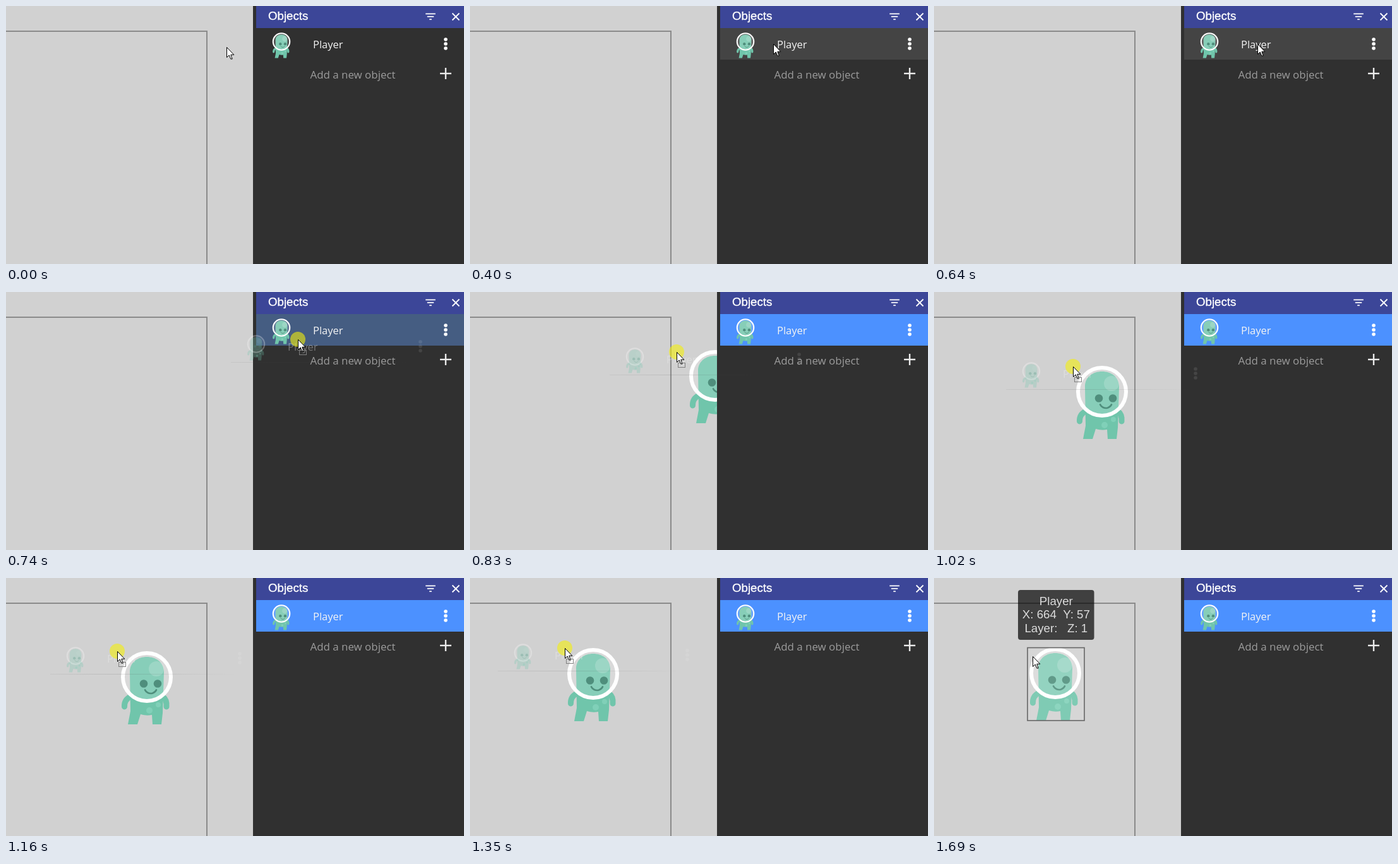
These frames come from a looping animation (725 px wide and 409 px high, 2.84 s). An HTML page with a canvas:

```html
<!DOCTYPE html>
<html lang="en">
<head>
<meta charset="utf-8">
<title>Drag an object onto the scene</title>
<style>
html, body { margin: 0; width: 100%; height: 100%; overflow: hidden; background: #303030; }
canvas { display: block; }
</style>
</head>
<body>
<canvas id="stage" width="725" height="409"></canvas>
<script>
const ctx = document.getElementById('stage').getContext('2d');
const W = 725, H = 409, LOOP = 2840;
const PANEL = 391, LIST = 396, ROW_TOP = 35, ROW_H = 50;
const ARIAL = '18.7px "Liberation Sans", Arial, sans-serif';
const DRAG = 740, DROP = 1450, LABEL = 1500;
const GRAB = { x: 502, y: 49 };
const REFRESH = 1000 / 60;

// Turning points of the pointer, joined by a smooth curve.
const PATH = [
  { t: 160, x: 349, y: 65 },
  { t: 400, x: 480, y: 60 },
  { t: 540, x: 529, y: 50 },
  { t: 740, x: 463, y: 75 },
  { t: 830, x: 328, y: 95 },
  { t: 1020, x: 220, y: 118 },
  { t: 1260, x: 158, y: 112.5 },
  { t: 1600, x: 148, y: 112 },
  { t: 1690, x: 156, y: 124 }
];

const clamp = (v, lo, hi) => Math.min(Math.max(v, lo), hi);

function slope(i, axis) {
  const a = PATH[Math.max(i - 1, 0)], b = PATH[Math.min(i + 1, PATH.length - 1)];
  return (b[axis] - a[axis]) / (b.t - a.t);
}

function pointer(time) {
  const t = clamp(time, PATH[0].t, PATH.at(-1).t);
  const i = Math.max(PATH.findIndex(p => p.t >= t) - 1, 0);
  const a = PATH[i], b = PATH[i + 1], d = b.t - a.t, u = (t - a.t) / d;
  const at = axis => {
    const p = a[axis], q = b[axis];
    const m = slope(i, axis) * d, n = slope(i + 1, axis) * d;
    return p + u * (m + u * (3 * (q - p) - 2 * m - n + u * (2 * (p - q) + m + n)));
  };
  return { x: at('x'), y: at('y') };
}

function rect(x, y, w, h, color) {
  ctx.fillStyle = color;
  ctx.fillRect(x, y, w, h);
}

function frameRect(x, y, w, h, color, width) {
  ctx.strokeStyle = color;
  ctx.lineWidth = width;
  ctx.strokeRect(x, y, w, h);
}

function dot(x, y, r, color) {
  ctx.fillStyle = color;
  ctx.beginPath();
  ctx.arc(x, y, r, 0, Math.PI * 2);
  ctx.fill();
}

function arc(x, y, r, from, to, color, width) {
  ctx.strokeStyle = color;
  ctx.lineWidth = width;
  ctx.beginPath();
  ctx.arc(x, y, r, from, to);
  ctx.stroke();
}

function line(x1, y1, x2, y2, color, width) {
  ctx.strokeStyle = color;
  ctx.lineWidth = width;
  ctx.beginPath();
  ctx.moveTo(x1, y1);
  ctx.lineTo(x2, y2);
  ctx.stroke();
}

function text(str, x, y, font, color, align = 'left') {
  ctx.font = font;
  ctx.fillStyle = color;
  ctx.textAlign = align;
  ctx.fillText(str, x, y);
}

const sans = size => `${size}px "Open Sans", "Noto Sans", sans-serif`;

const BODY = new Path2D('M-26 54L-27 -8C-27 -40 27 -40 27 -8L25 57L23 75H9L8 60' +
  'Q-1 62 -10 59L-15 75H-30Z');
const ARMS = new Path2D('M-26 31Q-36 36 -35.5 47M25 31Q32 36 31 47');
const ARROW = new Path2D('M.5 .5V16.5L4.2 13L6.8 19H9.2L6.8 12.3H11.8Z');

// Origin is the centre of the helmet.
function alien(x, y, scale = 1) {
  const skin = '#70c5ab', spot = '#80d0b8', face = '#4f8e7c';
  ctx.save();
  ctx.translate(x, y);
  ctx.scale(scale, scale);
  ctx.lineCap = 'round';
  ctx.strokeStyle = ctx.fillStyle = skin;
  ctx.lineWidth = 9;
  ctx.stroke(ARMS);
  ctx.fill(BODY);
  dot(4, 53, 5, spot);
  dot(18, 44, 4, spot);
  dot(0, 0, 37, 'rgba(255,255,255,.16)');
  dot(15, -13, 12, 'rgba(255,255,255,.18)');
  dot(-5, 10.5, 6.3, face);
  dot(17, 10.5, 6.3, face);
  arc(6, 16, 10, .45, Math.PI - .45, face, 2.6);
  arc(0, 0, 38, 0, Math.PI * 2, '#fff', 6);
  ctx.restore();
}

const rowIcon = () => alien(436, 56.5, .348);
const rowName = () => text('Player', 486, 67, sans(16.5), '#f4f4f4');

function rowDots() {
  for (let i = -1; i <= 1; i++) dot(696, 60 + i * 7, 2.8, '#fff');
}

function scene() {
  rect(0, 0, PANEL, H, '#d1d1d1');
  frameRect(-10, 40, 328, 400, '#8b8b8b', 2);
}

function rowColor(t, tip) {
  const k = clamp((t - 707) / 100, 0, 1);
  if (k === 0) return tip.x >= LIST ? '#444444' : '#303030';
  const mix = (a, b) => Math.round(a + (b - a) * k);
  return `rgb(${mix(66, 76)},${mix(66, 145)},${mix(66, 255)})`;
}

function header() {
  rect(LIST, 0, W - LIST, ROW_TOP, '#3c4698');
  text('Objects', 415, 22, ARIAL, '#fff');
  ctx.strokeStyle = '#fff';
  ctx.lineWidth = .35;
  ctx.strokeText('Objects', 415, 22);
  [7.8, 5.2, 1.8].forEach((half, i) => {
    const y = 12.4 + i * 4.4;
    line(672 - half, y, 672 + half, y, '#fff', 1.75);
  });
  for (const s of [-5.5, 5.5]) line(712 - s, 11.5, 712 + s, 22.5, '#fff', 1.8);
}

function panel(t, tip) {
  rect(PANEL, 0, W - PANEL, H, '#303030');
  header();
  rect(LIST, ROW_TOP, W - LIST, ROW_H, rowColor(t, tip));
  rowIcon();
  rowName();
  rowDots();
  text('Add a new object', 481.5, 115, sans(16.9), '#9c9c9c');
  line(687, 107, 705, 107, '#ececec', 2.4);
  line(696, 98, 696, 116, '#ececec', 2.4);
}

// Faint copy of the list row that hangs from the pointer.
function ghost(tip) {
  ctx.save();
  ctx.translate(tip.x - GRAB.x, tip.y - GRAB.y);
  const edge = ctx.createLinearGradient(LIST, 0, 690, 0);
  edge.addColorStop(0, 'rgba(70,70,70,.08)');
  edge.addColorStop(.4, 'rgba(70,70,70,.16)');
  edge.addColorStop(1, 'rgba(70,70,70,0)');
  rect(LIST, ROW_TOP + ROW_H, 294, 1, edge);
  ctx.globalAlpha = .28;
  rowIcon();
  ctx.globalAlpha = .36;
  rowName();
  ctx.globalAlpha = .1;
  rowDots();
  ctx.restore();
}

function selection(x, y) {
  rect(x - 44, y - 40, 90, 115, 'rgba(255,255,255,.1)');
  frameRect(x - 44, y - 40.5, 90, 115.5, '#666', 1.6);
  ctx.fillStyle = 'rgba(0,0,0,.69)';
  ctx.beginPath();
  ctx.roundRect(133, 19, 120.5, 79, 4);
  ctx.fill();
  ['Player', 'X: 664  Y: 57', 'Layer:   Z: 1'].forEach((str, i) =>
    text(str, 193.3, 43 + i * 21.3, ARIAL, '#dcdcdc', 'center'));
}

function cursor(tip, dragging) {
  ctx.save();
  ctx.translate(tip.x, tip.y);
  if (dragging) dot(0, 0, 12, 'rgba(244,238,10,.6)');
  ctx.fillStyle = '#fff';
  ctx.strokeStyle = '#000';
  ctx.lineWidth = 1;
  ctx.fill(ARROW);
  ctx.stroke(ARROW);
  if (dragging) {
    frameRect(2.5, 17.5, 11, 7, '#fff', 1);
    ctx.setLineDash([1, 1]);
    frameRect(2.5, 17.5, 11, 7, '#000', 1);
  }
  ctx.restore();
}

// The object is moved once per display refresh, until it is dropped.
function placed(t) {
  const p = pointer(Math.floor(Math.min(t, DROP) / REFRESH) * REFRESH);
  return { x: Math.round(p.x + 44.5), y: Math.round(p.y + 40.5) };
}

function draw(t) {
  const p = pointer(t);
  const tip = { x: Math.round(p.x), y: Math.round(p.y) };
  const dragging = t >= DRAG && t < DROP;
  scene();
  if (t >= DRAG) {
    const spot = placed(t);
    alien(spot.x, spot.y);
    if (t >= LABEL) selection(spot.x, spot.y);
  }
  panel(t, tip);
  if (dragging) ghost(tip);
  cursor(tip, dragging);
}

const start = performance.now();

function frame() {
  draw((performance.now() - start) % LOOP);
  requestAnimationFrame(frame);
}

frame();
</script>
</body>
</html>
```
